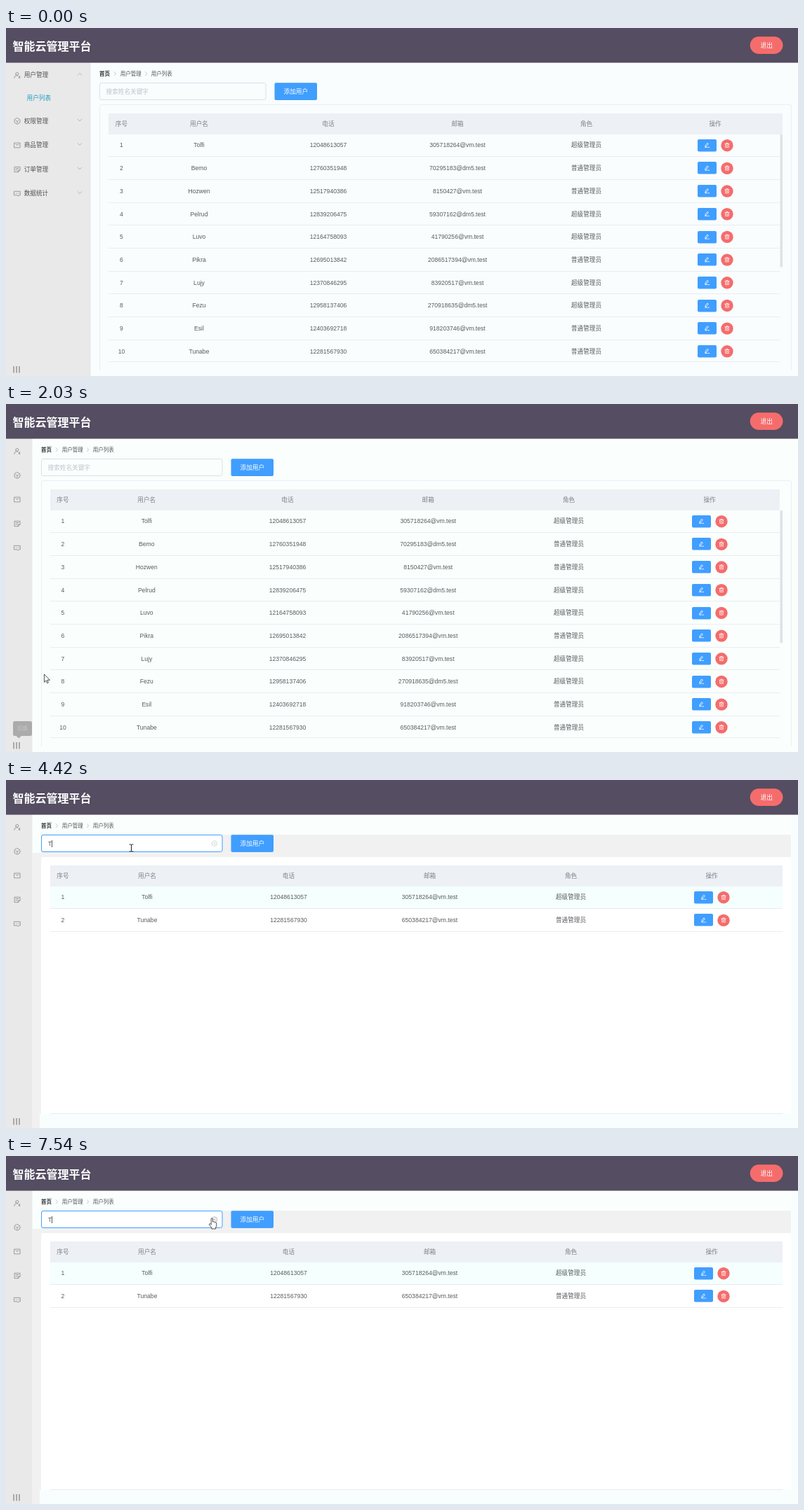
Recreate the animation shown at these times as an HTML page with a canvas. Size 1128 px wide and 497 px high, loop 8 s.

```html
<!DOCTYPE html>
<html lang="zh-CN">
<head>
<meta charset="utf-8">
<title>用户列表</title>
<style>
html, body { margin: 0; width: 100%; height: 100%; overflow: hidden; background: #fafdfe; }
canvas { display: block; width: 1128px; height: 497px; }
</style>
</head>
<body>
<canvas id="stage" width="1128" height="497"></canvas>
<script>
const ctx = document.getElementById('stage').getContext('2d');
const LOOP = 8000;
const FONT = '"Liberation Sans", "Noto Sans CJK SC", "Noto Sans CJK", sans-serif';
const BLUE = '#409eff', RED = '#f56c6c', INK = '#595b5f', MUTED = '#909399';
const ROW = 32.68, BODY_TOP = 151.4;

const users = `Tolfi 12048613057 305718264@vm.test 超级
Bemo 12760351948 70295183@dm5.test 普通
Hozwen 12517940386 8150427@vm.test 普通
Pelrud 12839206475 59307162@dm5.test 超级
Luvo 12164758093 41790256@vm.test 超级
Pikra 12695013842 2086517394@vm.test 普通
Lujy 12370846295 83920517@vm.test 超级
Fezu 12958137406 270918635@dm5.test 超级
Esil 12403692718 918203746@vm.test 普通
Tunabe 12281567930 650384217@vm.test 普通`.split('\n').map(line => line.split(' '));

const headings = ['序号', '用户名', '电话', '邮箱', '角色', '操作'];
const menu = ['用户管理', '权限管理', '商品管理', '订单管理', '数据统计'];

function rect(x, y, w, h, color) {
  ctx.fillStyle = color;
  ctx.fillRect(x, y, w, h);
}

function box(x, y, w, h, r, fill, stroke) {
  ctx.beginPath();
  ctx.roundRect(x, y, w, h, r);
  if (fill) { ctx.fillStyle = fill; ctx.fill(); }
  if (stroke) { ctx.strokeStyle = stroke; ctx.lineWidth = 1; ctx.stroke(); }
}

function disc(x, y, r, fill) {
  ctx.beginPath();
  ctx.arc(x, y, r, 0, Math.PI * 2);
  ctx.fillStyle = fill;
  ctx.fill();
}

function text(str, x, y, size, color, align = 'left', weight = 'normal') {
  ctx.font = `${weight} ${size}px ${FONT}`;
  ctx.textAlign = align;
  ctx.fillStyle = color;
  ctx.fillText(str, x, y + size * 0.36);
}

function shape(path, x, y, stroke, width = 0.8, fill) {
  ctx.save();
  ctx.translate(x, y);
  ctx.lineJoin = ctx.lineCap = 'round';
  const p = new Path2D(path);
  if (fill) { ctx.fillStyle = fill; ctx.fill(p); }
  ctx.strokeStyle = stroke;
  ctx.lineWidth = width;
  ctx.stroke(p);
  ctx.restore();
}

const icons = {
  menu: [
    'M-2.2-2a2 2 0 1 0 4 0a2 2 0 1 0-4 0M-4 4v-1q0-2.6 3-2.6h1.5M2 1.2l2 3M4 1.2l-2 3',
    'M0-4.4L3.9-2.2V2.2L0 4.4L-3.9 2.2V-2.2ZM-2-1L0 .5L2-1M0 .5V2.5',
    'M-4-3.4H4V3.4H-4ZM-2-1.2Q0 1.4 2-1.2',
    'M4 1V-3.7H-4V3.7H1.3L4 1H1.3V3.7M-2-1.5H2M-2 .8H0',
    'M-4.2-3.2H4.2V2.3H2.2L1 3.7L-.2 2.3H-4.2ZM-2-.4h.2M0-.4h.2M2-.4h.2'
  ],
  edit: 'M-2.6 1.9L-2.2 0L.4-3.1L1.9-1.9L-.7 1.2ZM-2.7 3H0M1.3 3H3.2',
  trash: 'M-3-1.9H3M-1.1-1.9V-3.1H1.1V-1.9M-2.3-1.9V3.1H2.3V-1.9M-.8-.3V1.6M.8-.3V1.6',
  clear: 'M-3.7 0a3.7 3.7 0 1 0 7.4 0a3.7 3.7 0 1 0-7.4 0M-1.3-1.3L1.3 1.3M1.3-1.3L-1.3 1.3',
  right: 'M-1.2-2.5L1.2 0L-1.2 2.5',
  down: 'M-3-1.4L0 1.4L3-1.4',
  up: 'M-3 1.4L0-1.4L3 1.4'
};

const pointers = {
  arrow: 'M0 0V11L2.6 8.6L4.3 12.4L6 11.6L4.3 8H7.6Z',
  hand: 'M-1.1 8.5V.8Q-1.1-.2 0-.2T1.1.8V5Q2.6 4.2 3.2 5.4Q4.7 4.8 5 6Q6.4 5.6 6.5 7.2V10Q6.5 12 5.3 13V15H-.4V13.3L-3.8 9.2Q-4.4 8-3.2 7.6Q-2.3 7.5-1.1 8.9',
  beam: 'M-2.5-5H-.8L0-4.4L.8-5H2.5M0-4.4V4.4M-2.5 5H-.8L0 4.4L.8 5H2.5'
};

// Fraction of a move made in n equal ticks, the first one falling on start.
function ticks(t, start, end, n) {
  if (t < start) return 0;
  return Math.min(n, Math.floor((t - start) / (end - start) * (n - 1) + 1e-6) + 1) / n;
}

const mix = (a, b, k) => a + (b - a) * k;
const smooth = k => k * k * (3 - 2 * k);

function drawHeader() {
  rect(0, 0, 1128, 49.6, '#554d62');
  text('智能云管理平台', 9.5, 26, 16, '#fff', 'left', 'bold');
  box(1059.7, 12.3, 46.8, 24.6, 12.3, RED);
  text('退出', 1083.2, 24.7, 8.7, '#fff', 'center');
}

function drawSidebar(wide) {
  rect(0, 49, wide ? 120.5 : 37.5, 448, '#e9e9e9');
  menu.forEach((label, i) => {
    const y = 67 + 34.5 * i + (wide && i ? 31 : 0);
    shape(icons.menu[i], 16, y + 0.5, '#85878c');
    if (!wide) return;
    text(label, 25.7, y, 8.65, '#505256');
    shape(i ? icons.down : icons.up, 105, y - 1, '#a2a4a9', 0.7);
  });
  if (wide) text('用户列表', 29.6, 99.7, 8.65, '#1b9cc6');
  for (const x of [11, 15, 19]) rect(x - 0.5, 483, 1, 9.5, '#77696a');
}

function drawBackground(wide, tinted, left) {
  const page = wide ? '#f9fdfe' : '#fafffd';
  rect(0, 49, 1128, 448, page);
  if (!tinted) {
    box(left + 0.5, 109.5, 1118 - left, 420, 2.5, null, '#ebeef5');
    rect(left, 489, 1128 - left, 8, page);
    return;
  }
  rect(1118, 49, 10, 448, '#f8fdfe');
  rect(left, 78, 1118 - left, 32, '#f1f1f1');
  rect(37.5, 104, 1080.5, 373, '#f1f1f1');
  rect(37.5, 477, 10.5, 20, '#f1f1f1');
  rect(48, 477, 1080, 20, '#f8fdfd');
  box(left, 110, 1118 - left, 367, [2.5, 2.5, 0, 0], '#fff');
}

function drawToolbar(t, wide, left) {
  const right = wide ? 370 : 308;
  text('首页', left, 65, 7.5, '#303133', 'left', 'bold');
  text('用户管理', left + 29.7, 65, 7.5, '#505256');
  text('用户列表', left + 73.8, 65, 7.5, '#505256');
  for (const dx of [22.3, 66.6]) shape(icons.right, left + dx, 65.2, '#b4b8c0');

  let border = '#dcdfe6';
  if (t >= 3090) border = BLUE;
  else if (t >= 2970) border = '#80b1e6';
  else if (t >= 2360) border = '#bcc0c7';
  box(left + 0.5, 78.5, right - left - 0.5, 24, 2.5, t >= 2040 ? '#fff' : null, border);

  const typed = t >= 4420;
  if (typed) {
    text('T', 60, 91, 8.65, INK);
    shape(icons.clear, 297, 90.7, t >= 7060 ? MUTED : '#c0c4cc', 0.7);
  } else {
    text('搜索姓名关键字', left + 9.5, 90.8, 8.65, '#bfc3cb');
  }
  const blinks = [2850, 3460, 3920, 4910, 5500, 6000, 6460, 7000, 7540];
  if (blinks.filter(at => t >= at).length % 2) rect(typed ? 65 : 60, 86, 1, 10, '#55585d');

  box(right + 12.5, 78.3, 60.5, 24.6, 2, BLUE);
  text('添加用户', right + 42.8, 90.6, 8.65, '#fff', 'center');
}

function drawTable(wide, tinted, filtered, left) {
  const x = left + 13;
  const bodyRight = filtered ? 1106 : 1102;
  const headRight = wide || filtered ? 1106 : 1102;
  const cols = wide ? [164.5, 275, 459, 643, 826.5, 1010]
    : filtered ? [81, 201, 402.5, 603.5, 804.5, 1005]
    : [81, 200.3, 401, 601.2, 801.5, 1002];
  const rows = filtered ? users.filter(u => u[0].startsWith('T')) : users;

  rect(x, 122, headRight - x, 30, '#edf0f5');
  headings.forEach((h, i) => text(h, cols[i], 136.5, 8.65, '#808389', 'center'));

  ctx.save();
  ctx.beginPath();
  ctx.rect(0, 152, 1128, 325);
  ctx.clip();
  rows.forEach(([name, phone, mail, role], i) => {
    const top = BODY_TOP + ROW * i, y = 167.4 + ROW * i;
    if (tinted && i % 2 === 0) rect(x, Math.round(top), bodyRight - x, 33, '#f4fffe');
    rect(x, Math.floor(top + ROW - 0.3), bodyRight - x, 1, '#e9ecf2');
    [i + 1, name, phone, mail, role + '管理员'].forEach((cell, c) =>
      text(String(cell), cols[c], y, 8.6, INK, 'center'));
    const a = cols[5];
    box(a - 25, Math.round(y - 8.6), 27, 17.5, 2, BLUE);
    shape(icons.edit, a - 11.5, y, '#fff', 0.85);
    disc(a + 17, y + 0.3, 8.7, RED);
    shape(icons.trash, a + 17, y, '#fff', 0.75);
  });
  rect(x, 476, bodyRight - x, 1, '#e9ecf2');
  ctx.restore();
  if (!filtered) box(1102.5, 152, 3.5, 189.5, 1, '#e0e2e5');
}

function drawTooltip(t) {
  const alpha = t < 1820 ? ticks(t, 830, 1050, 3) : 1 - ticks(t, 1820, 2040, 3);
  if (alpha <= 0) return;
  ctx.globalAlpha = alpha;
  box(10, 453, 27, 21, 2.5, '#303133');
  ctx.beginPath();
  ctx.moveTo(14.5, 474);
  ctx.lineTo(18.2, 477.6);
  ctx.lineTo(22, 474);
  ctx.fill();
  text('切换', 23.5, 463.6, 7.6, '#fff', 'center');
  ctx.globalAlpha = 1;
}

function pointerAt(t) {
  if (t < 500) return null;
  if (t < 1820) {
    const k = ticks(t, 500, 850, 4);
    return [k < 0.6 ? 'arrow' : 'hand', 11, mix(498, 487.5, k)];
  }
  if (t < 6460) {
    const k = smooth(ticks(t, 1820, 2360, 6));
    return [k < 1 ? 'arrow' : 'beam', mix(11, 178.5, k), mix(487.5, 97, k)];
  }
  if (t < 7060) {
    const k = 1 - Math.pow(1 - ticks(t, 6460, 7060, 6), 1.85);
    return ['beam', mix(178.5, 294, k), mix(97, 91, k)];
  }
  const k = ticks(t, 7300, 7540, 3);
  return ['hand', mix(294.3, 293.3, k), mix(88.5, 89, k)];
}

function drawPointer(t) {
  const pointer = pointerAt(t);
  if (!pointer) return;
  const [kind, x, y] = pointer;
  if (kind === 'beam') shape(pointers.beam, x, y, '#222', 1);
  else shape(pointers[kind], x, y, '#222', 0.8, '#fff');
}

function draw(t) {
  const wide = t < 1200, tinted = t >= 2040, filtered = t >= 4420;
  const left = wide ? 133 : 50;
  drawBackground(wide, tinted, left);
  drawSidebar(wide);
  drawHeader();
  drawToolbar(t, wide, left);
  drawTable(wide, tinted, filtered, left);
  drawTooltip(t);
  drawPointer(t);
}

let start;
function frame(now) {
  start ??= now;
  draw((now - start) % LOOP);
  requestAnimationFrame(frame);
}
draw(0);
requestAnimationFrame(frame);
</script>
</body>
</html>
```
